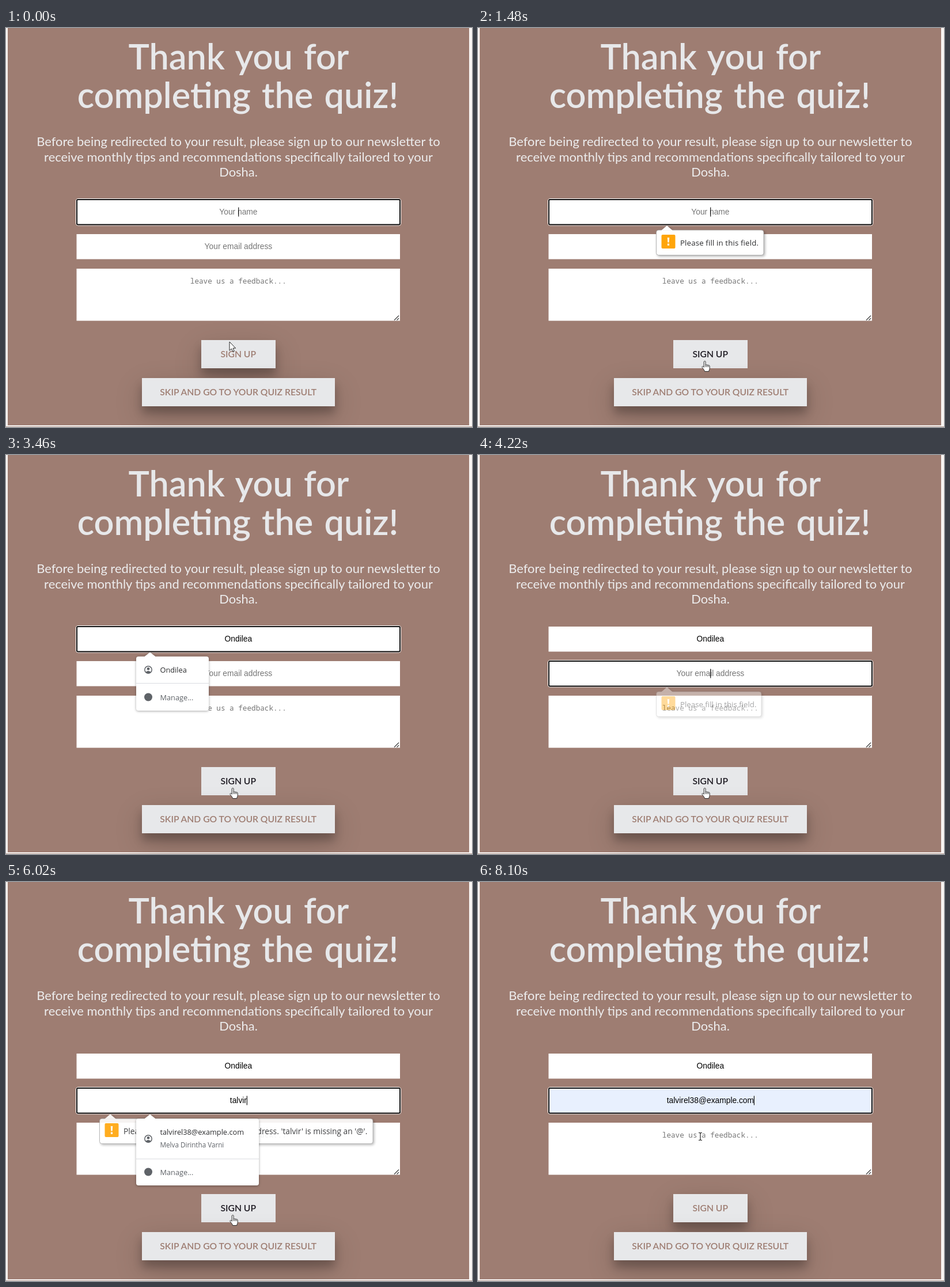
Recreate the animation shown at these times as an HTML page. Size 809 px wide and 693 px high, loop 8.35 s.

```html
<!DOCTYPE html>
<html lang="en">
<head>
<meta charset="utf-8">
<title>Quiz sign-up</title>
<style>
  html, body { margin: 0; width: 100%; height: 100%; overflow: hidden; background: #f8f4f2; }
  #stage { position: relative; width: 809px; height: 693px; overflow: hidden; }
  #page { position: absolute; left: 2.5px; top: 0; width: 801.5px; height: 690px; background: #9e7d72; }
  #foot { position: absolute; left: 0; top: 692px; width: 809px; height: 1px; background: #b59c93; }
  .btn {
    --s: 1;
    position: absolute; height: 49px; line-height: 49px; text-align: center;
    background: #e7e8ea; color: #9e7d72; white-space: nowrap;
    font: 600 15.7px/49px Lato, sans-serif;
    box-shadow: 0 12px 16px rgb(0 0 0 / calc(.24 * var(--s))), 0 17px 50px rgb(0 0 0 / calc(.19 * var(--s)));
  }
  #sign { left: 339px; top: 542px; width: 128.5px; }
  #skip { left: 235.5px; top: 608px; width: 335.5px; }
  svg { position: absolute; left: 0; top: 0; }
  .mid { text-anchor: middle; }
  .title { font: 600 61.2px Lato, sans-serif; word-spacing: 4px; fill: #e7e8ea; }
  .lead { font: 400 21.9px Lato, sans-serif; fill: #ededee; }
  .field { font: 13.8px "Liberation Sans", Arial, sans-serif; }
  .mono { font: 12.65px "Noto Sans Mono", monospace; fill: #757575; }
  .ui { font: 12.75px "Open Sans", sans-serif; fill: #2b2c2e; }
  .soft { fill: #5f6368; }
  .bubble { filter: drop-shadow(2px 2px 2px rgb(0 0 0 / .3)); }
  .menu { filter: drop-shadow(0 1px 2px rgb(0 0 0 / .35)); }
</style>
</head>
<body>
<div id="stage">
  <div id="page"></div>
  <div id="foot"></div>
  <div class="btn" id="sign">SIGN UP</div>
  <div class="btn" id="skip">SKIP AND GO TO YOUR QUIZ RESULT</div>
  <svg id="view" width="809" height="693" viewBox="0 0 809 693">
    <g class="mid title">
      <text x="404" y="72">Thank you for</text>
      <text x="402.5" y="138.5">completing the quiz!</text>
    </g>
    <g class="mid lead">
      <text x="403.5" y="205">Before being redirected to your result, please sign up to our newsletter to</text>
      <text x="403.5" y="231.7">receive monthly tips and recommendations specifically tailored to your</text>
      <text x="403.5" y="258.4">Dosha.</text>
    </g>
    <g id="fields"></g>
    <rect x="122.5" y="418" width="561.5" height="90.5" fill="#fff"/>
    <text class="mid mono" x="403.3" y="444">leave us a feedback...</text>
    <path d="M674 507.5l8-8M678.5 507.5l3.5-3.5" stroke="#444" stroke-width="1.3"/>
    <g id="bubbles"></g>
    <g id="menus"></g>
    <g id="arrow" stroke="#222" fill="#fff" stroke-linejoin="round">
      <path d="M0 0V15.2L3.5 12L6 17.3L8.3 16.3L6 11.1H10.6Z"/>
    </g>
    <g id="hand" stroke="#222" fill="#fff" stroke-linejoin="round">
      <path transform="translate(-7 -1) scale(.95)" d="M5.5 2c0-2 3-2 3 0v6c.3-1.3 2.6-1.2 2.7.3.5-1.2 2.5-.9 2.6.5.6-.9 2.2-.5 2.2 1v4c0 2-1.3 3-1.5 5.7H7c-.4-2-3-4.7-4.7-7.5-.8-1.5 1-2.6 2.2-1.4l1 1.2zM8.5 8v3.5M11.2 8.5v3M13.8 9v2.5"/>
    </g>
    <path id="beam" d="M-3-6.5h2l1 1 1-1h2M-3 6.5h2l1-1 1 1h2M0-5.5v11" fill="none" stroke="#222" stroke-width="1.2"/>
  </svg>
</div>
<script>
const LOOP = 8350;
const $ = id => document.getElementById(id);

function add(parent, tag, attrs = {}, text = '') {
  const el = document.createElementNS('http://www.w3.org/2000/svg', tag);
  for (const k in attrs) el.setAttribute(k, attrs[k]);
  el.textContent = text;
  parent.append(el);
  return el;
}

const show = (el, on) => { el.style.display = on ? '' : 'none'; };
const ramp = (t, a, b) => Math.min(1, Math.max(0, (t - a) / (b - a)));
const within = (t, spans) => spans.some(([a, b]) => t >= a && t < b);
const hold = (t, rows) => rows.reduce((v, [at, next]) => t >= at ? next : v, '');

function track(t, rows) {
  const i = rows.findIndex(r => r[0] > t);
  if (i < 0) return rows.at(-1).slice(1);
  const [a, b] = [rows[i - 1], rows[i]];
  const k = ramp(t, a[0], b[0]);
  return [1, 2].map(n => a[n] + (b[n] - a[n]) * k);
}

const typed = (word, times) => times.map((at, i) => [at, word.slice(0, i + 1)]);

const NAME = 'Ondilea', MAIL = 'talvirel38@example.com', PART = 'talvir';

function makeField(y, hint, cfg) {
  const g = add($('fields'), 'g');
  const box = add(g, 'rect', { x: 122.5, y, width: 561.5, height: 43.5, fill: '#fff' });
  const ring = add(g, 'g', { fill: 'none' });
  add(ring, 'rect', { x: 121.5, y: y - 1.5, width: 564, height: 46.5, rx: 3.5, stroke: '#fff' });
  add(ring, 'rect', { x: 123, y: y, width: 561, height: 43.5, rx: 2, stroke: '#101010', 'stroke-width': 2 });
  const label = add(g, 'text', { class: 'mid field', x: 403.4, y: y + 26.2 });
  const caret = add(g, 'rect', { y: y + 13.5, width: 1.1, height: 16, fill: '#000' });
  return t => {
    const value = hold(t, cfg.keys);
    label.textContent = value || hint;
    label.setAttribute('fill', value ? '#000' : '#757575');
    const half = value ? label.getComputedTextLength() / 2 : 0;
    caret.setAttribute('x', 403.2 + half);
    show(caret, within(t, cfg.caret));
    show(ring, within(t, cfg.focus));
    box.setAttribute('fill', t >= cfg.filled ? '#e8f0fe' : '#fff');
  };
}

// Text sits slightly wider once the fade has ended.
function makeBubble(x, y, tip, widths, size, gap, text, fade) {
  const g = add($('bubbles'), 'g', { class: 'bubble' });
  const body = add(g, 'path', { fill: '#fff', stroke: '#a0a0a0', 'stroke-width': .8 });
  add(g, 'path', { d: `M${tip - 10} ${y + .7}l10-8.4 10 8.4z`, fill: '#fff' });
  add(g, 'rect', { x: x + 9, y: y + 8, width: 24, height: 24, rx: 2, fill: '#ffa50a' });
  add(g, 'path', { d: `M${x + 19.3} ${y + 13}h3.4l-.6 8.5h-2.2zM${x + 19.4} ${y + 23.6}h3.2v3.2h-3.2z`, fill: '#fff' });
  const label = add(g, 'text', { class: 'ui', x: x + 41.5, y: y + 27 }, text);
  label.style.fontSize = size + 'px';
  return t => {
    const [a, b, c, d] = fade;
    show(g, t >= a && t < d);
    g.style.opacity = ramp(t, a, b) * (1 - ramp(t, c, d));
    const rest = t >= b && t < c;
    const w = widths[rest ? 1 : 0];
    label.style.letterSpacing = rest ? gap + 'px' : 0;
    body.setAttribute('d', `M${x + 4} ${y}h${w - 8}q4 0 4 4v35.5q0 4-4 4h${8 - w}q-4 0-4-4V${y + 4}q0-4 4-4z`);
  };
}

function makeMenu(y, w, lines, span, hover) {
  const g = add($('menus'), 'g', { class: 'menu' });
  const tall = lines.length > 1;
  const h = tall ? 116 : 94, cut = tall ? 70 : 46.5, mid = tall ? 35 : 23;
  add(g, 'path', { d: `M240 ${y + .5}l10-8 10 8z`, fill: '#fff' });
  add(g, 'rect', { x: 226, y, width: w, height: h, rx: 4, fill: '#fff' });
  const mark = add(g, 'rect', { x: 226, y: y + 4.5, width: w, height: 61, fill: '#e6e6e6' });
  add(g, 'rect', { x: 226, y: y + cut - .5, width: w, height: 1, fill: '#dadce0' });
  const face = add(g, 'g', { transform: `translate(247 ${y + mid})` });
  add(face, 'circle', { r: 6.2, fill: 'none', stroke: '#5f6368', 'stroke-width': 1.5 });
  add(face, 'circle', { cy: -1.7, r: 2.4, fill: '#5f6368' });
  add(face, 'path', { d: 'M-4.6 4.2q4.6-4.6 9.2 0Q0 8.4-4.6 4.2z', fill: '#5f6368' });
  add(g, 'text', { class: 'ui', x: 267.5, y: y + (tall ? 28 : 28) }, lines[0]);
  const sub = tall && add(g, 'text', { class: 'ui soft', x: 267.5, y: y + 50 }, lines[1]);
  if (sub) sub.style.fontSize = '11.7px';
  add(g, 'circle', { cx: 247, cy: y + h - 23.5, r: 7, fill: '#5f6368' });
  add(g, 'text', { class: 'ui soft', x: 267.5, y: y + h - 18.5 }, 'Manage...');
  return t => {
    show(g, within(t, [span]));
    show(mark, t >= hover);
    if (sub) sub.style.fill = t >= hover ? '#2b2c2e' : '';
  };
}

const fill = 'Please fill in this field.';
const parts = [
  makeField(298, 'Your name', {
    keys: typed(NAME, [2020, 2250, 2490, 2570, 2740, 2900, 2970]),
    caret: [[0, 150], [1150, 1650], [2020, 3460]],
    focus: [[0, 150], [1150, 3880]],
    filled: LOOP
  }),
  makeField(358, 'Your email address', {
    keys: [...typed(PART, [4770, 4910, 5060, 5210, 5350, 5560]), [6610, MAIL]],
    caret: [[3880, 4400], [4770, 6060], [7140, 7620], [8100, LOOP]],
    focus: [[3880, LOOP]],
    filled: 6610
  }),
  makeBubble(309.5, 351, 328, [182.5, 186.5], 13.25, .14, fill, [1150, 1450, 2020, 2200]),
  makeBubble(309.5, 411, 328, [182.5, 186.5], 13.25, .14, fill, [4030, 4500, 4770, 5000]),
  makeBubble(162.5, 411, 181, [474.5, 481.5], 13.75, .1,
    `Please include an '@' in the email address. '${PART}' is missing an '@'.`, [5630, 6060, 7070, 7210]),
  makeMenu(350, 126, [NAME], [2170, 3880], LOOP),
  makeMenu(411, 213, [MAIL, 'Melva Dirintha Varni'], [4910, 7070], 6610)
];

const path = [
  [0, 388, 545], [70, 388, 545], [230, 394, 579], [6440, 394, 579],
  [6690, 342, 441], [7800, 342, 441], [8100, 386, 442]
];
const shapes = [[0, 'arrow'], [150, 'hand'], [6530, 'arrow'], [7870, 'beam']];

function draw(t) {
  parts.forEach(p => p(t));
  const hover = t >= 150 && t < 6530;
  $('sign').style.color = hover ? '#1d1a22' : '';
  $('sign').style.setProperty('--s', 1 - ramp(t, 70, 230) + ramp(t, 6530, 6680));
  const [x, y] = track(t, path);
  const shape = hold(t, shapes);
  for (const id of ['arrow', 'hand', 'beam']) {
    show($(id), id === shape);
    $(id).setAttribute('transform', `translate(${x} ${y})`);
  }
}

const start = performance.now();
function tick() {
  draw((performance.now() - start) % LOOP);
  requestAnimationFrame(tick);
}
tick();
</script>
</body>
</html>
```
